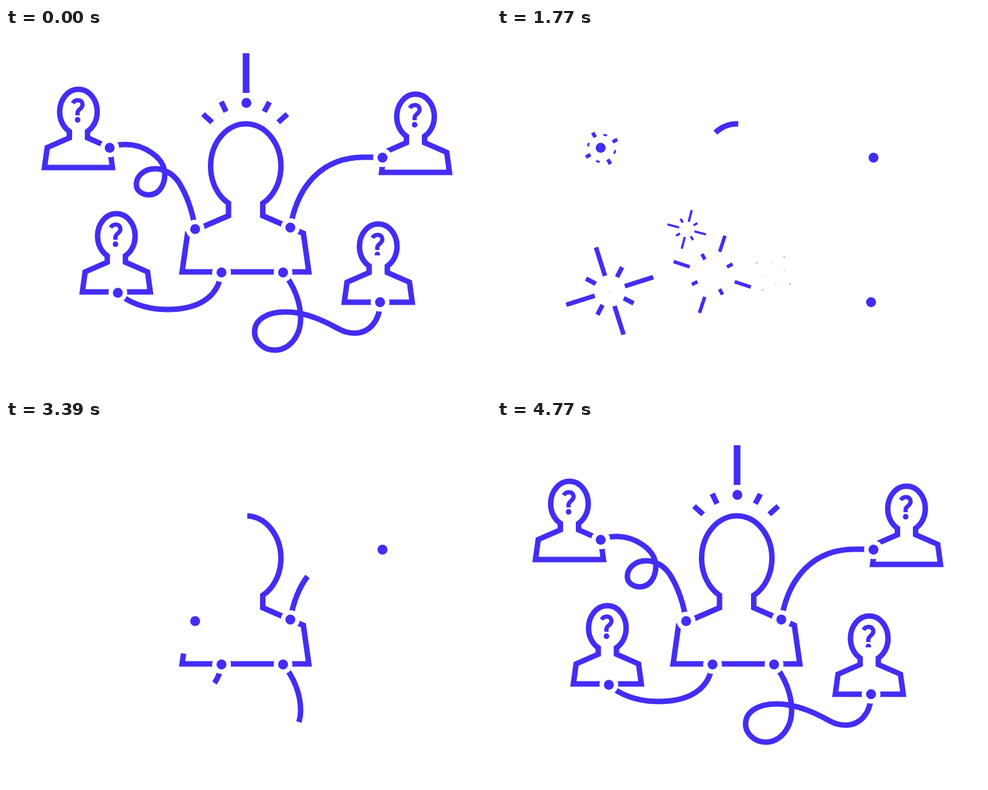
An HTML page for the animation above (4.8 s loop, 800 by 600 pixels).

```html
<!DOCTYPE html>
<html lang="en">
<head>
<meta charset="utf-8">
<title>Connected people</title>
<style>
html, body { margin: 0; width: 100%; height: 100%; overflow: hidden; background: #fff; }
svg { display: block; width: 100vw; height: 100vh; }
</style>
</head>
<body>
<svg id="stage" viewBox="0 0 800 600"></svg>
<script>
const LOOP = 4800, HALF = 2300, INK = '#432df4';
const stage = document.getElementById('stage');

function add(parent, tag, attrs) {
  const el = document.createElementNS('http://www.w3.org/2000/svg', tag);
  for (const k in attrs) el.setAttribute(k, attrs[k]);
  parent.appendChild(el);
  return el;
}

const clamp = x => Math.max(0, Math.min(1, x));
const span = (t, start, len) => clamp((t - start) / len);

// Symmetric ease, cubic-bezier(k, 0, 1 - k, 1)
function ease(x, k) {
  if (x <= 0 || x >= 1) return clamp(x);
  let lo = 0, hi = 1, s = 0.5;
  for (let i = 0; i < 24; i++) {
    s = (lo + hi) / 2;
    const q = 1 - s;
    const v = 3 * s * q * q * k + 3 * s * s * q * (1 - k) + s * s * s;
    if (v < x) lo = s; else hi = s;
  }
  return s * s * (3 - 2 * s);
}
const soft = x => ease(x, 0.4);
const firm = x => ease(x, 0.6);
const brake = x => 1 - Math.pow(1 - x, 2.05);
const plain = x => x;

const lines = add(stage, 'g', { fill: 'none', stroke: INK, 'stroke-width': 9, 'stroke-miterlimit': 10 });
const sparks = add(stage, 'g', { stroke: INK });
const dots = add(stage, 'g', {});

// Strokes: erased from the start of the path, later drawn from it
const strokes = [];
function stroke(d, out, back, parent = lines, attrs = {}) {
  const el = add(parent, 'path', { d, ...attrs });
  strokes.push({ el, len: el.getTotalLength(), out, back });
}

function trim({ el, len }, a, b) {
  el.style.display = b - a < 0.0005 ? 'none' : '';
  if (a <= 0 && b >= 1) el.removeAttribute('stroke-dasharray');
  else el.setAttribute('stroke-dasharray', `0 ${a * len} ${(b - a) * len} ${len * 2}`);
}

// Dots with a white halo
const pins = [];
function pin(x, y, out, back, halo = 15.5, parent = dots, r = 8.2) {
  const g = add(parent, 'g', {});
  if (halo) add(g, 'circle', { r: halo, fill: '#fff' });
  add(g, 'circle', { r, fill: INK, stroke: 'none' });
  pins.push({ g, x, y, out, back });
}

// Bursts of four long and four short rays
const bursts = [];
function burst(x, y, angle, r, start) {
  const g = add(sparks, 'g', { transform: `translate(${x} ${y}) rotate(${angle}) scale(${r})`, 'stroke-width': 0.29 });
  const rays = [];
  for (let i = 0; i < 8; i++) {
    rays.push({ el: add(g, 'line', { transform: `rotate(${i * 45})`, y1: 0, y2: 0 }), reach: i % 2 ? 0.85 : 2.3 });
  }
  bursts.push({ g, rays, start });
}

// Central figure
stroke('M398 158.1A58 70 0 0 1 453.5 228A58 70 0 0 1 423.5 289V309.5L490.5 338.5L499.5 402H290.5' +
  'L299.5 338.5L367 309.5V289A58 70 0 0 1 337.5 228A58 70 0 0 1 398 158.1',
  [385, 1735, firm], [2425, 1735, firm]);

// Connecting curves
const curveOut = [250, 1560, soft];
const curve = (d, start) => stroke(d, curveOut, [start, 1560, brake]);
curve('M469 329C480 262 520 213 590 213H621', 3087);
curve('M457 403C475 424 486 452 486 479C486 508 467 531 443 531C425 531 410 517 410 501' +
  'C410 481 430 468 461 468C492 468 520 480 545 494C556 500 563 503 575 503C598 503 617 484 617 452', 3215);
curve('M355 403C351 440 322 464 266 464C235 464 208 456 184 437', 3265);
curve('M312 331C308 303 298 275 286 256C276 240 261 232 246 232C229 232 215 243 215 258' +
  'C215 268 224 275 236 275C252 275 262 259 262 241C262 212 225 192 198 192C188 192 180 193 171 197', 3396);

// Outer figures, all in coordinates around the centre of the head
const head = 'L-15 43V32.4A31 37 0 0 1 -31 0A31 37 0 0 1 31 0A31 37 0 0 1 15 32.4V43';
const mark = 'M-9.5 -14C-7.5 -17.5 -4.5 -19 -1 -19C4 -19 6.8 -15.5 6.8 -11.5C6.8 -5 -1.5 -4 -1.5 1.5V6';
const ringL = `H-56L-51.5 59${head}L51.5 59L56 92`;
const clip = add(add(stage, 'defs', {}), 'clipPath', { id: 'cut' });
add(clip, 'rect', { x: -20, y: -30, width: 40, height: 44.7 });

function person(x, y, d, out, back, askOut, askBack, cut) {
  const g = add(lines, 'g', { transform: `translate(${x} ${y})` });
  stroke(d, out, [back, 1150, firm], g);
  const ask = add(g, 'g', cut ? { 'clip-path': 'url(#cut)' } : {});
  stroke(mark, [askOut, 330, soft], [askBack, 290, soft], ask, { 'stroke-width': 7 });
  pin(-1.4, 13.4, askOut + 300, askBack + 250, 0, ask, 4.6);
}
person(119.5, 138, `M51.5 59L56 92H-56L-51.5 59${head}L51.5 59`, curveOut, 3560, 120, 4320);
person(675.5, 146, `M-52.6 67L-51.5 59${head}L51.5 59L56 92H-56L-52.6 67`, curveOut, 3550, 90, 4060);
person(182, 343, `M7 92${ringL}H7`, [49, 1480, soft], 3620, 20, 4250);
person(614, 360, `M3 92${ringL}H3`, curveOut, 3615, 60, 4150, true);

// Exclamation and rays above the central head
stroke('M396 41.5V107', [590, 300, soft], [4180, 290, soft], lines, { 'stroke-width': 11 });
for (const d of ['M340 155.5L325 142', 'M363 138L355 121.5', 'M426 138L434.5 122', 'M449 155.5L464 142']) {
  stroke(d, [600, 270, plain], [4420, 200, plain]);
}
pin(396.5, 123.5, 860, 4420, 0);

// [dot x, dot y, dot returns, burst x, burst y, angle, size, burst starts]
const joints = [
  [469, 329, 3000, 473, 330, -26, 18, 980],
  [457, 403, 3130, 456, 404.5, 32.5, 10, 1010],
  [355.5, 403, 3160, 355, 406, 18.3, 20.3, 1235],
  [184.5, 436.5, 3735, 186, 433.5, -17.6, 26, 1400],
  [312, 331.5, 3225, 313, 332, 14.5, 13, 1473],
  [171, 197.5, 3755, 172.5, 198.3, -29.5, 21, 1690],
  [621, 213.7, 2960, 621, 216, 19.5, 18.2, 1775],
  [617, 452, 3400, 616, 454.8, 39.1, 33, 1788]
];
for (const [x, y, back, bx, by, angle, r, start] of joints) {
  pin(x, y, start + 105, back);
  burst(bx, by, angle, r, start);
}
burst(401, 156.5, 31, 30, 1820);

function draw(t) {
  for (const s of strokes) {
    const [start, len, fn] = t < HALF ? s.out : s.back;
    const p = fn(span(t, start, len));
    if (t < HALF) trim(s, p, 1); else trim(s, 0, p);
  }
  for (const { g, x, y, out, back } of pins) {
    const size = t < out ? 1 : soft(span(t, back, 160));
    g.style.display = size > 0 ? '' : 'none';
    g.setAttribute('transform', `translate(${x} ${y}) scale(${size})`);
  }
  for (const { g, rays, start } of bursts) {
    const a = span(t, start + 375, 400), b = span(t, start, 450);
    g.style.display = b > a ? '' : 'none';
    for (const { el, reach } of rays) {
      el.setAttribute('x1', 1 + reach * a);
      el.setAttribute('x2', 1 + reach * b);
    }
  }
}

const begin = performance.now();
function tick() {
  draw((performance.now() - begin) % LOOP);
  requestAnimationFrame(tick);
}
tick();
</script>
</body>
</html>
```
